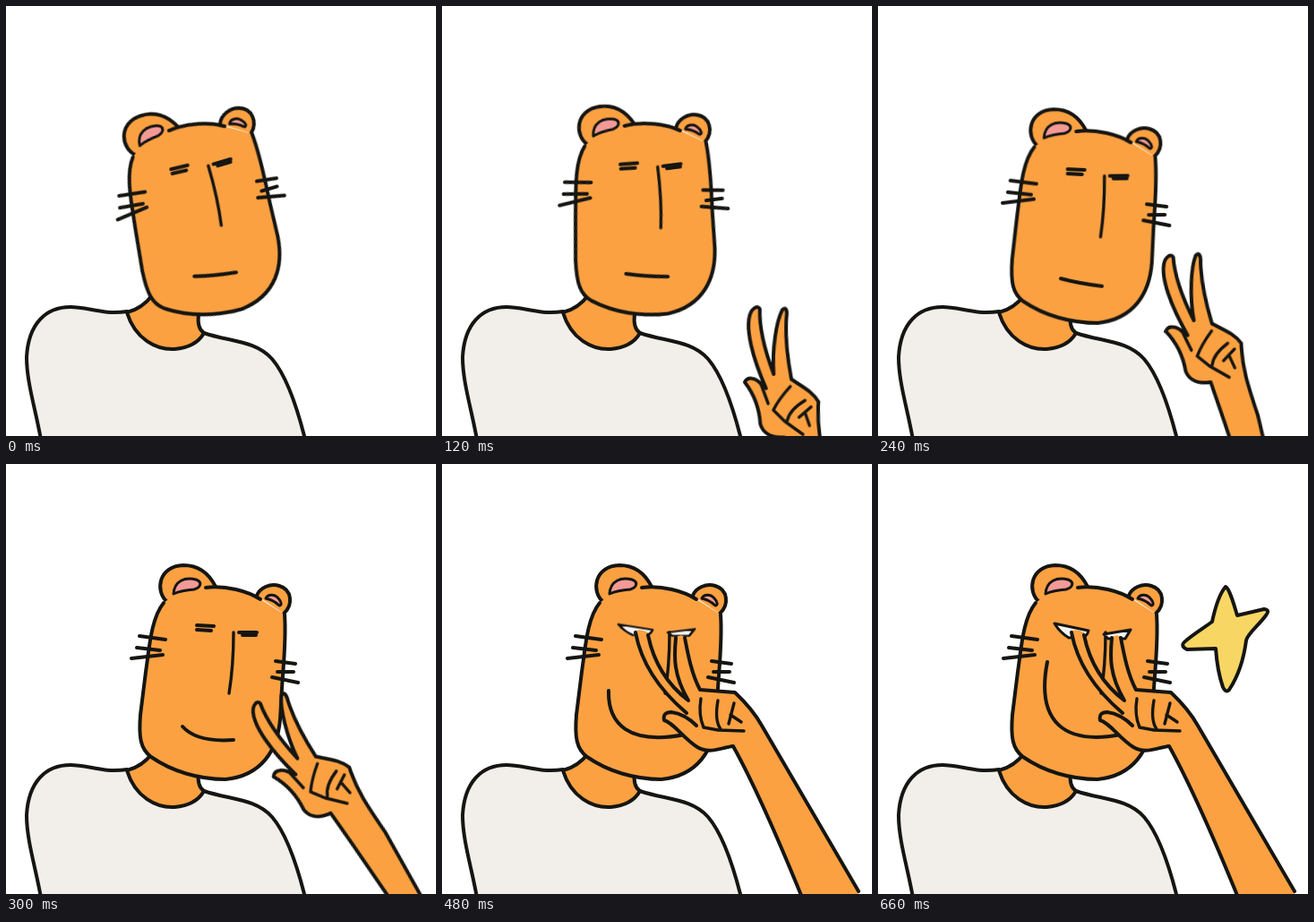
Recreate the animation shown at these times as an HTML page without scripts. Size 480 by 480 pixels, loop 0.84 s.

```html
<!DOCTYPE html>
<html lang="en">
<head>
<meta charset="utf-8">
<title>Peace sign</title>
<style>
  html, body { margin: 0; width: 100%; height: 100%; overflow: hidden; background: #fff; }
  svg { display: block; width: 100vw; height: 100vh; }
  path { stroke: #151512; stroke-width: 4; stroke-linecap: round; stroke-linejoin: round; fill: none; }
  .skin { fill: #fba142; }
  .bare { stroke: none; }
  .shirt { fill: #f2eeea; }
  .pink { fill: #f39a96; stroke-width: 3; }
  .white { fill: #f4f4f2; stroke-width: 3; }
  .yellow { fill: #f8d664; }
  .thin { stroke-width: 3.4; }

  .head, .mouth, .shut, .open, .raise, .reach, .pull, .star { animation: .84s step-end infinite; }
  .head { transform-origin: 227px 308px; animation-name: tilt; }
  .mouth { animation-name: smile; }
  .shut { animation-name: shut; }
  .open { transform-origin: 240px 182px; animation-name: open; }
  .raise { transform-origin: 383px 405px; animation-name: raise; }
  .reach { animation-name: reach; }
  .pull { animation-name: pull; }
  .star { transform-origin: 388px 195px; animation-name: pop; }

  @keyframes tilt {
    0% { transform: translate(7px, -7px) rotate(-16.5deg); }
    7.14% { transform: translate(4px, -6.5px) rotate(-12deg); }
    14.28% { transform: translate(2px, -6px) rotate(-7.2deg); }
    21.42% { transform: translate(1px, -4px) rotate(-2.3deg); }
    28.57% { transform: translate(0, 2px) rotate(-.6deg); }
    35.71%, 100% { transform: none; }
  }
  @keyframes smile {
    0% { d: path("M204 302Q226 308 250 311"); }
    35.71% { d: path("M197 293Q213 311 254 308"); }
    42.85% { d: path("M190 284C200 304 230 309 258 304"); }
    49.99% { d: path("M187 268C190 296 218 312 265 304"); }
    57.14% { d: path("M186 253C185 290 208 314 271 302"); }
    71.42% { d: path("M187 236C180 290 208 314 271 302"); }
    78.57%, 100% { d: path("M189 221C176 288 208 314 271 302"); }
  }
  @keyframes shut {
    0% { visibility: visible; }
    57.14%, 100% { visibility: hidden; }
  }
  @keyframes open {
    0% { visibility: hidden; }
    57.14% { visibility: visible; transform: scaleY(.75); }
    71.42% { visibility: visible; transform: scaleY(.9); }
    78.57%, 100% { visibility: visible; transform: none; }
  }
  @keyframes raise {
    0% { visibility: hidden; }
    7.14% { visibility: visible; transform: translate(28px, 125px) rotate(3deg); }
    14.28% { visibility: visible; transform: translate(14px, 43px) rotate(2deg); }
    21.42% { visibility: visible; transform: none; }
    28.57% { visibility: visible; transform: translate(0, -20px) rotate(-4deg); }
    35.71% { visibility: visible; transform: translate(-19px, -52px) rotate(-20deg); }
    42.85%, 100% { visibility: hidden; }
  }
  @keyframes reach {
    0% { visibility: hidden; }
    42.85% { visibility: visible; transform: none; }
    49.99% { visibility: visible; transform: translate(-16px, -21px); }
    57.14%, 100% { visibility: hidden; }
  }
  @keyframes pull {
    0% { visibility: hidden; }
    57.14%, 100% { visibility: visible; }
  }
  @keyframes pop {
    0% { visibility: hidden; }
    71.42% { visibility: visible; transform: scale(.6); }
    78.57%, 100% { visibility: visible; transform: none; }
  }
</style>
</head>
<body>
<svg viewBox="0 0 480 480">
  <g class="body">
    <path class="shirt" d="M39 484C33 450 23 420 23 392C25 355 44 336 72 336C92 336 108 345 135 341C145 375 190 398 221 365C250 375 278 373 297 394C315 415 326 452 334 484"/>
    <path class="skin" d="M164 322Q152 338 135 342C144 372 168 384 188 383Q212 381 221 365Q213 360 215 344"/>
  </g>

  <g class="head">
    <path class="skin" d="M180 154C166 142 170 114 198 113C215 113 227 123 234 137"/>
    <path class="skin" d="M280 147C283 138 295 133 305 136C319 140 321 157 310 167"/>
    <path class="skin bare" d="M176 155Q195 139 224 138C245 135 270 142 284 151L311 168L306 285L245 352L150 290Z"/>
    <path class="skin" d="M176 155C162 172 160 205 156 232L150 280C148 305 150 318 162 327C185 343 215 352 245 352C285 348 303 320 306 285L308 250C310 220 313 195 311 168"/>
    <path d="M223 138C245 135 270 142 284 151"/>
    <path class="pink" d="M187 145C188 130 200 126 212 129C220 132 217 138 210 140Q196 141 187 145Z"/>
    <path class="pink" d="M290 150C292 145 300 145 304 150C308 154 308 158 305 158Q299 152 290 150Z"/>
    <path d="M149 192L178 196M146 205L172 208M140 217L175 213M301 220L323 223M303 232L321 232M297 238L326 244"/>
    <path class="thin" d="M254 188Q254 225 249 256"/>
    <path class="shut" d="M213 180L232 181M213 185L229 186M260 188L280 188M264 191L279 191"/>
    <g class="open">
      <path class="white" d="M197 178L235 186Q233 194 227 193L213 194Q203 188 197 178Z"/>
      <path class="white" d="M252 190L282 185L276 195L257 195Z"/>
    </g>
    <path class="mouth" d="M204 302Q226 308 250 311"/>
  </g>

  <g class="raise">
    <path class="skin" d="M398 550L380 480L369 439C355 440 345 435 342 425C340 405 333 391 323 379C326 372 335 374 341 380L347 385C330 350 322 320 326 304C328 296 335 292 337 297C337 320 345 345 355 369C352 340 356 310 362 297C366 292 368 298 367 305C366 330 370 352 375 374C390 383 400 388 406 398C405 425 410 445 419 480L432 560"/>
    <path class="thin" d="M341 380L350 402M374 382Q362 396 356 409L369 421L390 435M391 397Q374 408 372 420M398 404L385 416M392 412L397 425"/>
  </g>

  <g class="reach">
    <path class="skin" d="M410 516L397 480L354 359C348 364 340 368 330 364C315 355 306 338 291 334C285 333 286 327 290 325L300 317C275 310 258 297 251 276C249 270 255 271 260 273Q290 288 306 304C290 292 272 275 264 251C263 243 268 241 273 246C288 260 303 284 325 299L362 302C376 317 385 335 391 348L447 468L470 518"/>
    <path class="thin" d="M297 315Q311 325 319 338M327 309Q321 327 327 342L372 346M345 313Q340 335 350 345M362 318L358 333M361 327L371 335"/>
  </g>

  <g class="pull">
    <path class="skin bare" d="M216 186Q222 184 230 188C236 220 250 245 275 264C258 235 259 215 261 194Q266 189 271 193C275 215 279 235 288 252L327 255Q347 274 357 292L465 477V484H402C380 430 350 360 325 316L292 320Q265 302 248 282L273 278C240 250 222 220 216 186Z"/>
    <path d="M216 188C222 220 240 250 273 278M230 191C236 220 250 245 275 264C258 235 259 215 261 194M271 194C275 215 279 235 288 252L327 255Q347 274 357 292L465 477M402 484C380 430 350 360 325 315C310 317 298 324 285 316C268 305 260 290 248 286Q246 277 256 277Q271 279 284 292"/>
    <path class="thin" d="M289 262Q286 280 292 294L308 297L337 298M308 264Q304 286 311 296M326 267L320 290M322 280L334 288"/>
  </g>

  <path class="star yellow" d="M388 137C392 139 396 152 401 169L431 162Q438 163 433 169C425 180 412 190 411 197C408 220 400 240 392 252Q388 256 385 249C380 235 378 220 377 206L345 207Q336 203 344 197C352 190 365 182 373 176C376 162 381 145 388 137Z"/>
</svg>
</body>
</html>
```
